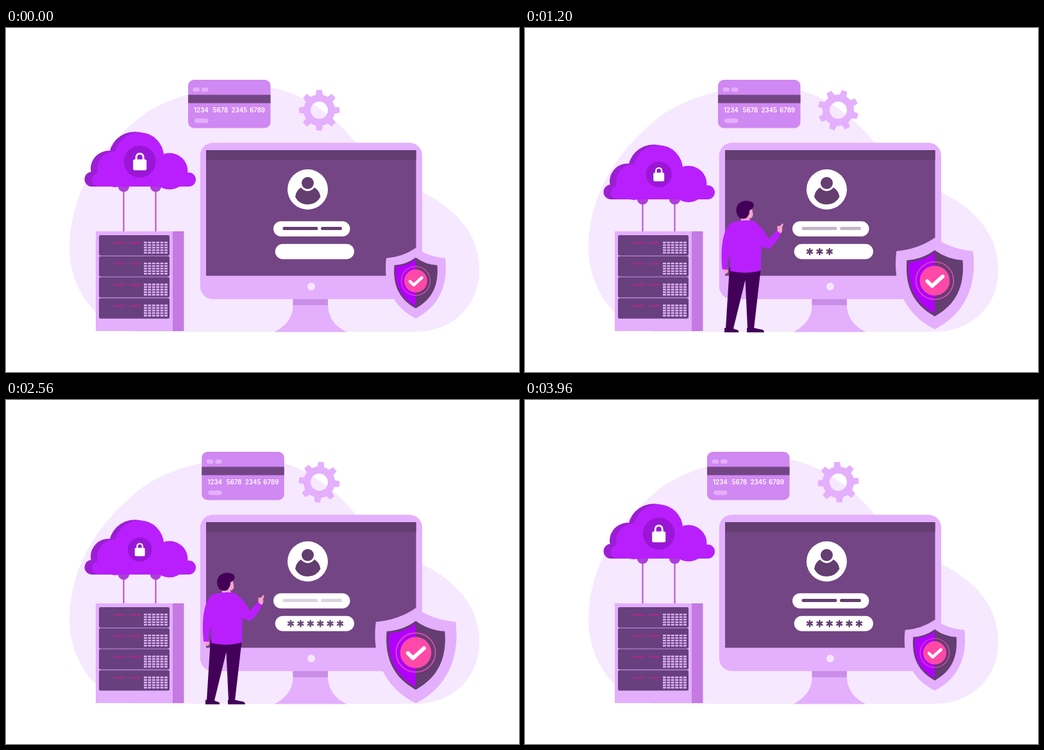
Write an HTML page that moves like this. It is 800 px wide and 538 px high and loops after 4 s.

```html
<!DOCTYPE html>
<html lang="en">
<head>
<meta charset="utf-8">
<title>Secure login</title>
<style>
  html, body { margin: 0; width: 100%; height: 100%; overflow: hidden; background: #fff; }
  svg { display: block; width: 100%; height: 100%; }
  text { font: 600 9.7px Inter, "Open Sans", sans-serif; fill: #fff; }
  .lilac { fill: #e4affd; }
  .plum { fill: #734584; }
  .dusk { fill: #643d71; }
  .violet { fill: #b91ffd; }
  .deep { fill: #9b1fd3; }
  .ink { fill: #430059; }
  .skin { fill: #f5a3cb; }
  .line { fill: none; stroke-linecap: round; stroke-linejoin: round; }
</style>
</head>
<body>
<svg viewBox="0 0 800 538">
  <path fill="#f6e8fe" d="M200 475C135 465 99 400 99 345C99 255 150 185 215 135C265 102 330 90 385 90C450 92 505 130 546 180C570 210 610 232 650 257C705 285 738 325 738 378C738 440 690 475 640 475Z"/>

  <g id="card">
    <rect x="284" y="81" width="128.5" height="75.5" rx="9" fill="#d088f2"/>
    <rect class="plum" x="284" y="104.5" width="128.5" height="13"/>
    <g class="lilac">
      <rect x="291.5" y="93" width="10.5" height="6.5" rx="3.2"/>
      <rect x="305" y="93" width="10.5" height="6.5" rx="3.2"/>
      <rect x="294" y="141.5" width="21.5" height="7" rx="3.5"/>
    </g>
    <text x="293" y="132">1234</text><text x="322.5" y="132">5678</text>
    <text x="351.5" y="132">2345</text><text x="380" y="132">6789</text>
  </g>

  <g id="gear" class="lilac">
    <circle r="19" fill="none" stroke="#e4affd" stroke-width="11"/>
  </g>

  <!-- cloud and cables -->
  <g stroke="#b547dc" stroke-width="2">
    <path id="cables"/>
  </g>
  <g id="cloud">
    <g fill="#ad3ddb"><circle cx="183.5" cy="247.5" r="8.7"/><circle cx="233.5" cy="247.5" r="8.7"/></g>
    <g class="deep">
      <circle cx="134" cy="236.5" r="11.5"/><circle cx="160" cy="220" r="28"/>
      <circle cx="201" cy="202.7" r="40.5"/><path d="M134 225H200V248H134Z"/>
    </g>
    <g class="violet">
      <circle cx="144.5" cy="237.5" r="10.5"/><circle cx="170" cy="221" r="28"/>
      <circle cx="208" cy="201.5" r="38.3"/><circle cx="255" cy="224" r="28.5"/>
      <circle cx="285" cy="237" r="11"/><path d="M144.5 227H285V248H144.5Z"/>
    </g>
    <g id="lock">
      <circle r="25" fill="#9a16d6"/>
      <rect x="-10.5" y="-3.5" width="21" height="17" rx="2.5" fill="#fff"/>
      <path class="line" d="M-5.5-3V-7A5.5 5.5 0 0 1 5.5-7V-3" stroke="#fff" stroke-width="3"/>
    </g>
  </g>

  <!-- server -->
  <path class="lilac" d="M140 318H260V474H140Z"/>
  <path fill="#c47ae2" d="M260 318H277.5V474H260Z"/>
  <g id="racks"></g>

  <!-- monitor -->
  <path class="lilac" d="M447.5 424H502V434C503 454 514 467 531.5 475.5H418.5C437 466 447.5 452 447.5 434Z"/>
  <path fill="#ca8ee8" d="M447.5 424H502V433.5H447.5Z"/>
  <rect class="lilac" x="302.8" y="179.5" width="346.2" height="244.5" rx="20"/>
  <path class="plum" d="M312 191H639.5V387.5H312Z"/>
  <path class="dusk" d="M312 191H639.5V206.5H312Z"/>
  <circle cx="476" cy="404.3" r="6" fill="#f6e6fd"/>
  <circle cx="470.5" cy="252.5" r="31.5" fill="#fff"/>
  <path class="dusk" d="M451 264Q453 248 470.5 247Q488 248 490.5 264Q484 276 470.5 276Q457 276 451 264Z"/>
  <circle class="dusk" cx="470.5" cy="242.5" r="11" stroke="#fff" stroke-width="3"/>
  <g fill="#fff">
    <rect x="417" y="302.3" width="119.5" height="23.6" rx="11.8"/>
    <rect x="419.7" y="337.7" width="123.3" height="23.8" rx="11.9"/>
  </g>
  <path id="user" class="line" d="M434 313.5H484M493.5 313.5H521.5" stroke="#643d71" stroke-width="5"/>
  <g id="stars" class="line" stroke="#643d71" stroke-width="2.5"></g>

  <!-- visitor -->
  <g id="man">
    <path class="ink" d="M319 374H368L357 470H347L343.5 394L325 470H313Z"/>
    <path class="ink" d="M311 476V469H324Q326 471 332 472.5Q334 475 333 476ZM346 476V469H357Q365 471 371 472Q373 474 373 476Z"/>
    <g id="head">
      <path class="skin" d="M344 282H354.5L356 291Q356 298 350 298L352 303H337L338 292Z"/>
      <path class="ink" d="M334 296C328 288 328 275 340 271C348 269 357 272 357.5 276C358 281 355 284 351 285L350 291L346 297Q339 300 334 296Z"/>
    </g>
    <g id="leftArm">
      <path class="skin" d="M306.5 374H314L315 381Q313 385 309.5 383.5Q306 380 306.5 374Z"/>
      <path class="violet" d="M326 302.5C308 309 303.5 345 306 377L314 378C314 366 318 353 323 343Z"/>
    </g>
    <path class="violet" d="M324 303.5Q343 299 357 302C366 306 368 318 369 330L368 379Q345 386 320 380V330Z"/>
    <g id="rightArm">
      <path class="skin" d="M393 320L393.5 311.5L397 312L402 308L403 309.5L400.5 315Q402 320 397.5 324H393Z"/>
      <path class="violet" d="M355 302C365 305 373 319 379 331L392 318.5L398.5 324Q388 342 377 347Q368 344 360 334Z"/>
    </g>
  </g>

  <g id="shield">
    <path class="lilac" d="M0-53Q-20-39-46-37C-51 5-36 39 0 57C36 39 51 5 46-37Q20-39 0-53Z"/>
    <path class="dusk" d="M0-38Q-15-27-33.5-26C-36 5-26 27 0 41.5C26 27 36 5 33.5-26Q15-27 0-38Z"/>
    <path fill="#b200fd" transform="scale(.92)" d="M0-38Q-15-27-33.5-26C-36 5-26 27 0 41.5Z"/>
    <circle cy="-1.5" r="22.6" fill="none" stroke="#e14fb4" stroke-width="1.2"/>
    <circle cy="-1.5" r="18" fill="#fe49a8"/>
    <path class="line" d="M-9-.8L-3.2 5L9.5-6.5" stroke="#fff" stroke-width="4.5"/>
  </g>
</svg>
<script>
const LOOP = 4000, FRAME = 40;
const el = id => document.getElementById(id);
const range = n => [...Array(n).keys()];
const clamp01 = v => Math.min(1, Math.max(0, v));
const progress = (t, from, to) => clamp01((t - from) / (to - from));
const wave = p => (1 - Math.cos(2 * Math.PI * p)) / 2;
const smooth = p => p * p * (3 - 2 * p);
const backIn = p => p * p * (2.70158 * p - 1.70158);
const move = (id, value) => el(id).setAttribute('transform', value);

el('gear').innerHTML += range(8).map(i =>
  `<path d="M-5.6-23L-4.3-31.7H4.3L5.6-23Z" transform="rotate(${i * 45})"/>`).join('');

el('racks').innerHTML = range(4).map(i => {
  const grid = range(5).map(r => `M215 ${335.5 + r * 4}H252`).join('');
  return `<g transform="translate(0 ${i * 32.8})">
    <rect x="145" y="324" width="110" height="32" rx="2.5" fill="#684080"/>
    <g class="lights" fill="none">
      <path d="M169 336H184.5M193.5 336H209" stroke="#d11a8c" stroke-width="2" stroke-dasharray="4.2 1.4"/>
      <path d="${grid}" stroke="#dfb0f3" stroke-width="2.6" stroke-dasharray="4.9 1.5"/>
    </g></g>`;
}).join('');

el('stars').innerHTML = range(6).map(i =>
  `<path transform="translate(${444 + i * 15.4} 349.7)" d="M0-4.5V4.5M-3.9-2.25L3.9 2.25M3.9-2.25L-3.9 2.25"/>`).join('');

const lights = document.querySelectorAll('.lights');
const stars = el('stars').children;
const dimTimes = [720, 3480, 2830, 1880];

function draw(t) {
  const sway = wave(t / LOOP);
  move('card', `translate(${26 * sway} 0)`);
  move('gear', `translate(488.5 128.5) rotate(${360 * t / LOOP})`);

  const drop = 30.5 * sway;
  move('cloud', `translate(0 ${drop})`);
  move('lock', `translate(208.7 209) scale(${1 - 0.3 * sway})`);
  el('cables').setAttribute('d', `M183.5 ${248 + drop}V318M233.5 ${248 + drop}V318`);

  const swell = (sway + Math.sqrt(sway)) / 2;
  move('shield', `translate(639 397) scale(${1 + 0.41 * swell})`);

  lights.forEach((light, i) => {
    const near = clamp01(1 - Math.abs(t - dimTimes[i]) / 280);
    light.setAttribute('opacity', 1 - 0.85 * wave(near / 2));
  });

  el('user').setAttribute('opacity', 1 - 0.95 * sway);
  const blink = 1 - 0.7 * wave(progress(t, 2400, 4000));
  range(6).forEach(i =>
    stars[i].setAttribute('opacity', progress(t, i * 400, i * 400 + 400) * blink));

  // The visitor pops in with an overshoot and leaves the same way.
  const away = t < 2000 ? 1 - progress(t, 120, 800) : progress(t, 3200, 3880);
  const size = Math.max(0, 1 - backIn(away));
  move('man', `translate(311 476) scale(${size}) translate(-311 -476)`);
  const lean = smooth(progress(t, 1000, 1500)) - smooth(progress(t, 2300, 2800));
  move('head', `rotate(${-4 * lean} 345 310)`);
  move('leftArm', `rotate(${-4 * lean} 322 310)`);
  move('rightArm', `rotate(${-10 * lean} 362 310)`);
}

function tick() {
  draw(Math.floor(performance.now() % LOOP / FRAME) * FRAME);
  requestAnimationFrame(tick);
}
tick();
</script>
</body>
</html>
```
